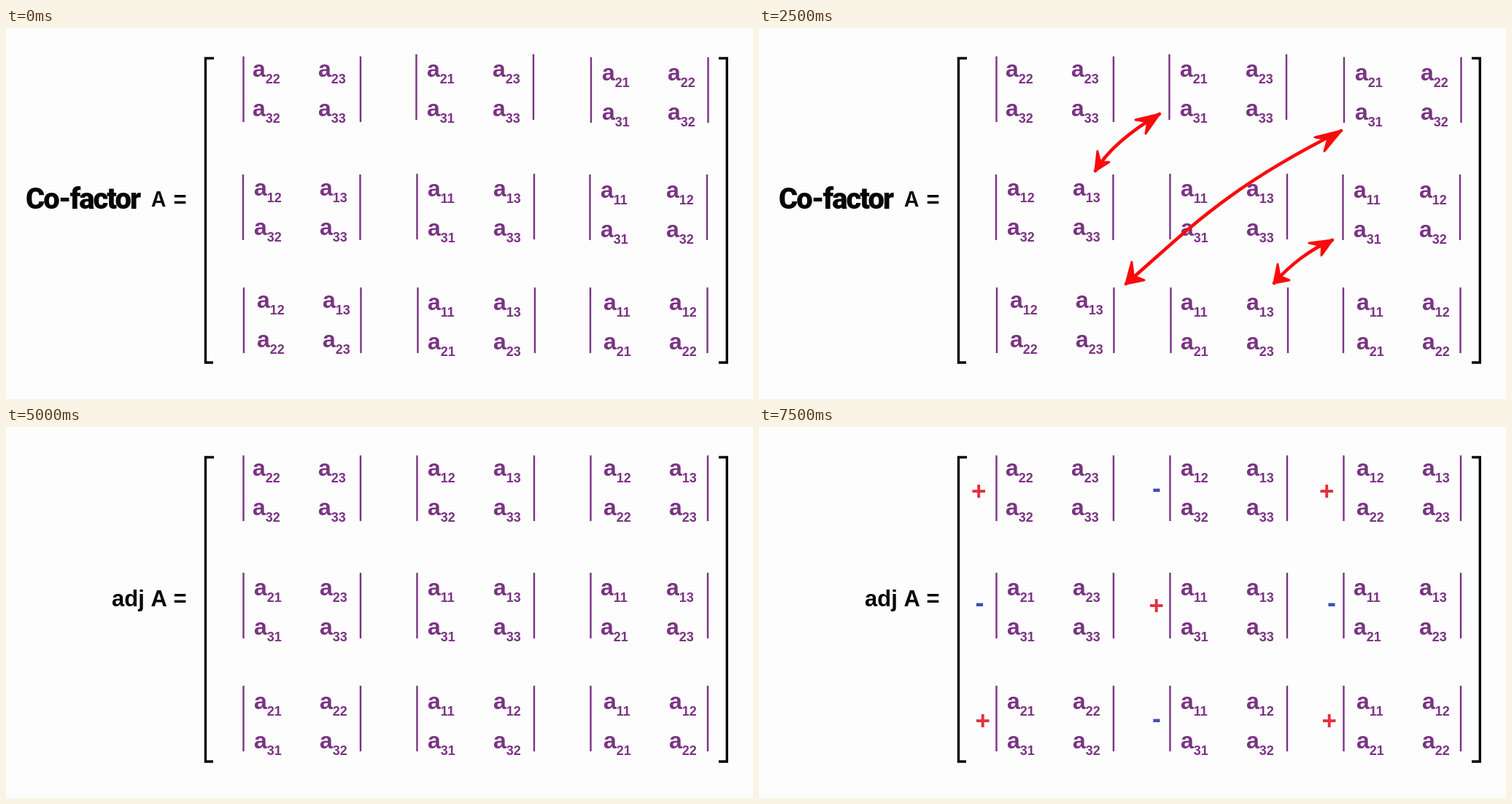
An HTML page with a canvas for the animation above (8000 ms loop, 1024 px wide and 509 px high).

```html
<!DOCTYPE html>
<html lang="en">
<head>
<meta charset="utf-8">
<title>Adjoint of a matrix</title>
<style>
  html, body { margin: 0; width: 100%; height: 100%; overflow: hidden; background: #fdfdfd; }
  canvas { display: block; }
</style>
</head>
<body>
<canvas id="stage" width="1024" height="509"></canvas>
<script>
const ctx = document.getElementById('stage').getContext('2d');
const LOOP = 8000, ARROWS_AT = 2500, ADJOINT_AT = 5000, SIGNS_AT = 6500;
const SANS = '"Liberation Sans", Arial, sans-serif';
const PURPLE = '#793482', BLACK = '#050505', RED = '#fa0a0c';

// Each minor: left bar x, bar top, text x, first baseline, four indices.
const cofactors = [
  [325.5, 39, 338, 67, '22 23 32 33'],
  [562.5, 36, 577, 67, '21 23 31 33'],
  [802, 40, 817, 72, '21 22 31 32'],
  [325, 201, 340, 230, '12 13 32 33'],
  [563.5, 200, 578, 231, '11 13 31 33'],
  [800.5, 201, 815, 233, '11 12 31 32'],
  [326, 356, 344, 384, '12 13 22 23'],
  [564.5, 356, 578, 387, '11 13 21 23'],
  [801, 356, 819, 387, '11 12 21 22']
];
const adjoint = [
  [325.5, 39, 338, 67, '22 23 32 33'],
  [563.5, 39, 578, 67, '12 13 32 33'],
  [801.5, 39, 819, 67, '12 13 22 23'],
  [325.5, 200, 340, 231, '21 23 31 33'],
  [563.5, 200, 578, 231, '11 13 31 33'],
  [801.5, 200, 815, 231, '11 13 21 23'],
  [325.5, 355, 340, 387, '21 22 31 32'],
  [563.5, 355, 578, 387, '11 12 31 32'],
  [801.5, 355, 819, 387, '11 12 21 22']
];

// Shaft as a cubic curve; each head lists its two barb ends.
const arrows = [
  { shaft: [461, 196, 476, 171, 505, 144, 549, 118],
    start: [464, 169, 480, 184], end: [516, 126, 530, 145] },
  { shaft: [503, 351, 580, 285, 635, 222, 798, 141],
    start: [511, 321, 528, 346], end: [762, 150, 775, 169] },
  { shaft: [706, 350, 727, 326, 756, 303, 786, 291],
    start: [711, 324, 727, 346], end: [754, 295, 771, 312] }
];

const signs = [
  ['+', 301.5, 87.5], ['-', 545, 86.5], ['+', 778.5, 87.5],
  ['-', 302.5, 243.5], ['+', 545, 245], ['-', 785, 243.5],
  ['+', 307, 403], ['-', 545, 402.5], ['+', 782, 403]
];

function text(str, x, y, font, color, spacing = 0) {
  ctx.font = font;
  ctx.fillStyle = color;
  ctx.letterSpacing = spacing + 'px';
  ctx.fillText(str, x, y);
}

function line(points, color, width) {
  ctx.strokeStyle = color;
  ctx.lineWidth = width;
  ctx.beginPath();
  for (let i = 0; i < points.length; i += 2) ctx.lineTo(points[i], points[i + 1]);
  ctx.stroke();
}

function minor([barX, top, x, y, indices]) {
  for (const bx of [barX, barX + 160.5]) line([bx, top, bx, top + 90], PURPLE, 2.4);
  indices.split(' ').forEach((index, i) => {
    const ex = x + (i % 2) * 90, ey = y + (i >> 1) * 54;
    text('a', ex, ey, 'bold 32px ' + SANS, PURPLE);
    text(index, ex + 17.8, ey + 8.5, 'bold 18px ' + SANS, PURPLE);
  });
}

function brackets() {
  line([285, 41.5, 273.5, 41.5, 273.5, 459, 284, 459], BLACK, 3.4);
  line([977, 41.5, 988.3, 41.5, 988.3, 459, 977, 459], BLACK, 3.4);
}

function head(x, y, [ax, ay, bx, by]) {
  const nx = x + ((ax + bx) / 2 - x) * 0.62;
  const ny = y + ((ay + by) / 2 - y) * 0.62;
  ctx.beginPath();
  ctx.moveTo(x, y);
  ctx.lineTo(ax, ay);
  ctx.lineTo(nx, ny);
  ctx.lineTo(bx, by);
  ctx.closePath();
  ctx.lineWidth = 3;
  ctx.fill();
  ctx.stroke();
}

function arrow({ shaft, start, end }) {
  ctx.save();
  ctx.lineCap = ctx.lineJoin = 'round';
  ctx.strokeStyle = ctx.fillStyle = RED;
  ctx.lineWidth = 4.6;
  ctx.beginPath();
  ctx.moveTo(shaft[0], shaft[1]);
  ctx.bezierCurveTo(...shaft.slice(2));
  ctx.stroke();
  head(shaft[0], shaft[1], start);
  head(shaft[6], shaft[7], end);
  ctx.restore();
}

// Centres the ink of the sign on the given point.
function sign([str, cx, cy]) {
  const plus = str === '+';
  const font = `bold ${plus ? 35 : 36}px ${SANS}`;
  ctx.font = font;
  ctx.letterSpacing = '0px';
  const m = ctx.measureText(str);
  const x = cx - (m.actualBoundingBoxRight - m.actualBoundingBoxLeft) / 2;
  const y = cy + (m.actualBoundingBoxAscent - m.actualBoundingBoxDescent) / 2;
  text(str, x, y, font, plus ? '#e2303f' : '#3f4db8');
}

function draw(t) {
  ctx.fillStyle = '#fdfdfd';
  ctx.fillRect(0, 0, 1024, 509);
  brackets();
  if (t < ADJOINT_AT) {
    text('Co-factor', 27, 248, '900 40px Roboto, sans-serif', BLACK, -2);
    text('A', 199, 245, '600 28px Inter, sans-serif', BLACK);
    text('=', 229.5, 246, 'bold 31px ' + SANS, BLACK);
    cofactors.forEach(minor);
    if (t >= ARROWS_AT) arrows.forEach(arrow);
  } else {
    text('adj A =', 145, 245.5, 'bold 31px ' + SANS, BLACK);
    adjoint.forEach(minor);
    if (t >= SIGNS_AT) signs.forEach(sign);
  }
}

const began = performance.now();
function tick() {
  draw((performance.now() - began) % LOOP);
  requestAnimationFrame(tick);
}
tick();
</script>
</body>
</html>
```
